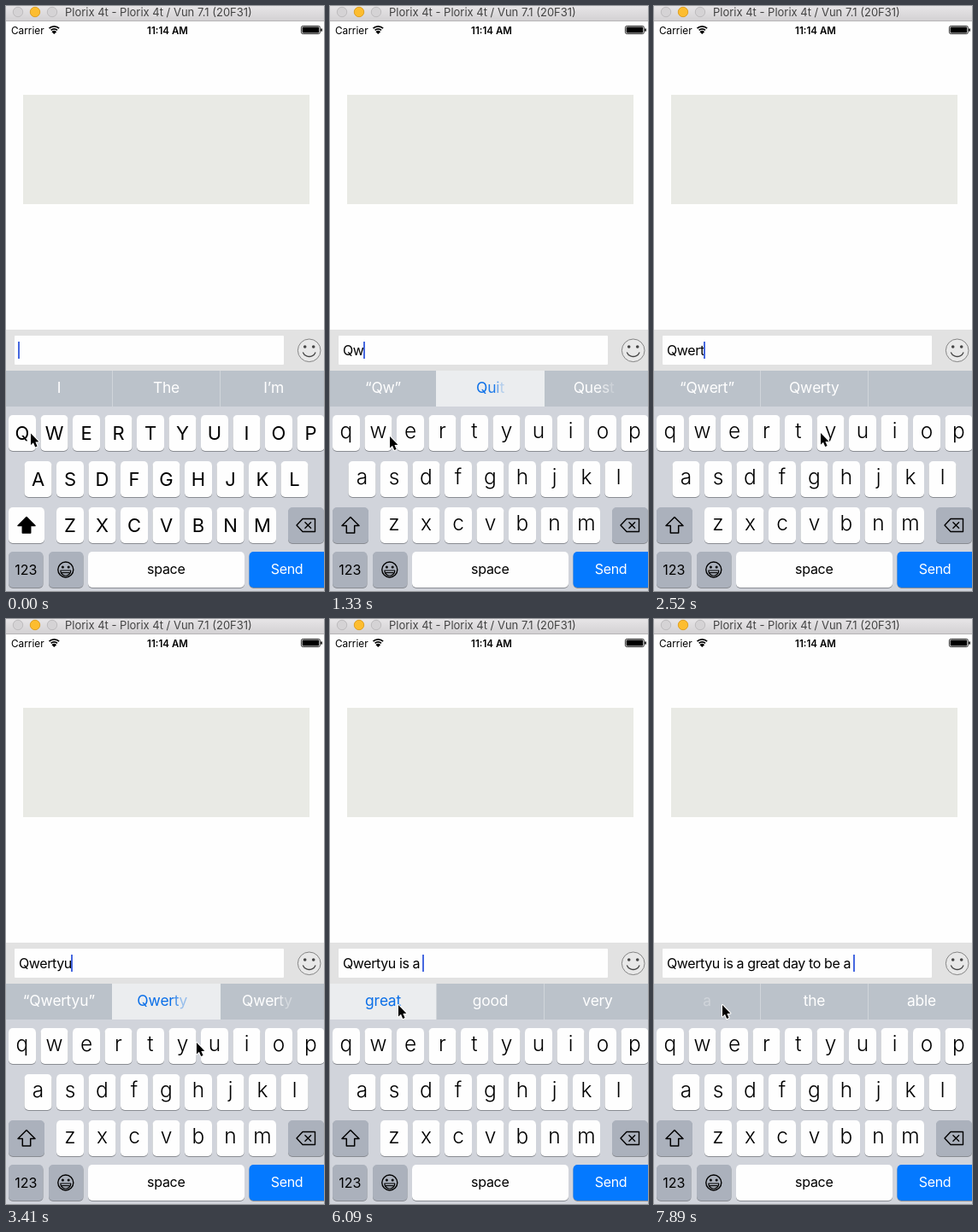
Write an HTML page with a canvas that moves like this. It is 372 by 685 pixels and loops after 8 s.

```html
<!DOCTYPE html>
<html lang="en">
<head>
<meta charset="utf-8">
<title>Keyboard typing</title>
<style>
html, body { margin: 0; width: 100%; height: 100%; overflow: hidden; background: #fff; }
canvas { display: block; }
</style>
</head>
<body>
<canvas id="stage" width="372" height="685"></canvas>
<script>
const ctx = document.getElementById('stage').getContext('2d');
const LOOP = 8000, STEP = 148.8;
const FONT = 'Inter, "Liberation Sans", sans-serif';
const BLUE = '#0a6fe8';

// time, typed text, three suggestions, is the middle one preselected, is the left one pressed to get here
const states = [
  [-999, '', ['I', 'The', 'I’m']],
  [830, 'Q', ['“Q”', 'Quite', 'Question']],
  [1120, 'Qw', ['“Qw”', 'Quit', 'Quests'], true],
  [1480, 'Qwe', ['“Qwe”', 'We', 'Awe'], true],
  [1850, 'Qwer', ['“Qwer”', 'Query', 'Qwerty']],
  [2200, 'Qwert', ['“Qwert”', 'Qwerty', '']],
  [2700, 'Qwerty', ['“Qwerty”', 'Qwerty', 'Qwerty’s']],
  [3200, 'Qwertyu', ['“Qwertyu”', 'Qwerty I', 'Qwerty u'], true],
  [4500, 'Qwertyu ', ['is', 'was', 'and'], false, true],
  [5000, 'Qwertyu is ', ['a', 'the', 'not'], false, true],
  [5600, 'Qwertyu is a ', ['great', 'good', 'very'], false, true],
  [6220, 'Qwertyu is a great ', ['day', 'way', 'time'], false, true],
  [6500, 'Qwertyu is a great day ', ['to', 'for', 'and']],
  [6830, 'Qwertyu is a great day to ', ['be', 'get', 'see']],
  [7270, 'Qwertyu is a great day to be ', ['a', 'the', 'able']],
  [7850, 'Qwertyu is a great day to be a ', ['good', 'great', 'part']]
];

// pointer path: time, x, y
const path = [
  [0, 29, 500.5], [140, 27, 501], [893, 27, 501], [1190, 64, 503], [1339, 70, 504],
  [1500, 98, 503], [1640, 101, 502], [1860, 134, 502], [2232, 172, 502], [2529, 195, 500],
  [2720, 204, 501], [2830, 206, 501], [3200, 240, 503], [3274, 238, 502], [3422, 223, 496],
  [4464, 87, 453], [4613, 86, 452], [5200, 80, 452], [LOOP, 80, 452]
];

const clamp = v => Math.max(0, Math.min(1, v));

function text(str, x, y, size, color, align = 'center', weight = 400, spacing = 0) {
  ctx.font = `${weight} ${size}px ${FONT}`;
  ctx.letterSpacing = spacing + 'px';
  ctx.textAlign = align;
  ctx.fillStyle = color;
  ctx.fillText(str, x, y);
}

function rect(x, y, w, h, color) {
  ctx.fillStyle = color;
  ctx.fillRect(x, y, w, h);
}

function round(x, y, w, h, r, color) {
  ctx.beginPath();
  ctx.roundRect(x, y, w, h, r);
  ctx.fillStyle = color;
  ctx.fill();
}

function disc(x, y, r, fill, stroke, width = 1) {
  ctx.beginPath();
  ctx.arc(x, y, r, 0, Math.PI * 2);
  if (fill) { ctx.fillStyle = fill; ctx.fill(); }
  if (stroke) { ctx.strokeStyle = stroke; ctx.lineWidth = width; ctx.stroke(); }
}

function arc(x, y, r, from, to, color, width) {
  ctx.beginPath();
  ctx.arc(x, y, r, from * Math.PI, to * Math.PI);
  ctx.strokeStyle = color;
  ctx.lineWidth = width;
  ctx.stroke();
}

function shape(points, fill, stroke, width = 1.5) {
  ctx.beginPath();
  points.forEach(([x, y]) => ctx.lineTo(x, y));
  ctx.closePath();
  ctx.lineJoin = 'round';
  if (stroke) { ctx.strokeStyle = stroke; ctx.lineWidth = width; ctx.stroke(); }
  if (fill) { ctx.fillStyle = fill; ctx.fill(); }
}

function key(x, y, w, color = '#fefefe') {
  round(x, y + 1, w, 42, 5, '#898c92');
  round(x, y, w, 42, 5, color);
}

function drawTop() {
  rect(0, 0, 372, 685, '#fefefe');
  const bar = ctx.createLinearGradient(0, 0, 0, 17);
  bar.addColorStop(0, '#e7e5e7');
  bar.addColorStop(1, '#d3d1d3');
  rect(0, 0, 372, 17, bar);
  rect(0, 17, 372, 1, '#b6b4b6');
  disc(14, 7, 5.7, '#d5d3d5', '#bebcbe');
  disc(34, 7, 5.7, '#fdbd2f', '#dfa023');
  disc(54, 7, 5.7, '#d5d3d5', '#bebcbe');
  text('Plorix 4t - Plorix 4t / Vun 7.1 (20F31)', 69, 12, 13, '#434343', 'left');

  text('Carrier', 6, 32.5, 11.8, '#000', 'left');
  for (const r of [9, 6]) arc(56.3, 32, r - 0.8, 1.25, 1.75, '#000', 1.7);
  ctx.beginPath();
  ctx.moveTo(56.3, 33);
  ctx.arc(56.3, 33, 4, 1.25 * Math.PI, 1.75 * Math.PI);
  ctx.fillStyle = '#000';
  ctx.fill();
  text('11:14 AM', 189, 32.5, 11.5, '#000', 'center', 600);
  ctx.strokeStyle = '#000';
  ctx.lineWidth = 0.8;
  ctx.beginPath();
  ctx.roundRect(345.4, 23.4, 22, 9.2, 2);
  ctx.stroke();
  round(346.6, 24.6, 19.6, 6.8, 1, '#000');
  round(368.3, 26.3, 1.6, 3.6, 0.8, '#000');

  rect(20, 104, 335, 128, '#e9eae5');
}

function drawInput(str, caret) {
  rect(0, 379, 372, 48, '#e2e2e2');
  round(10, 386, 315, 34, 1, '#fefefe');
  disc(354.7, 403.3, 13.3, '#e8e8e8', '#858585', 1);
  disc(349.7, 399, 1.8, '#444');
  disc(359.7, 399, 1.8, '#444');
  arc(354.7, 402.5, 8, 0.12, 0.88, '#444', 1.3);
  text(str, 15, 409, 16, '#000', 'left', 400, -0.4);
  const x = 14 + Math.round(ctx.measureText(str).width);
  ctx.globalAlpha = caret;
  rect(x, 393, 2, 20, '#4668e0');
  ctx.globalAlpha = 1;
}

// Letters fade one after another from the left
function word(str, slot, color, p, leaving) {
  const n = str.length, spacing = -0.15;
  ctx.font = `400 17.4px ${FONT}`;
  ctx.letterSpacing = spacing + 'px';
  const shift = leaving ? [0, 16, 10][slot] * Math.min(1, p * 3) : 0;
  const left = 62 + slot * 125.5 - ctx.measureText(str).width / 2 - shift;
  for (let i = 0; i < n; i++) {
    const a = clamp((p * (n + 3) - i) / 3);
    ctx.globalAlpha = leaving ? 1 - a : a;
    const x = left + ctx.measureText(str.slice(0, i)).width;
    text(str[i], x, 453, 17.4, color, 'left', 400, spacing);
  }
  ctx.globalAlpha = 1;
}

function drawSuggestions(t, at) {
  const [since, , words, preselect] = states[at];
  const next = states[at + 1];
  const pressed = next && next[4] && t > next[0] - STEP;
  const lit = pressed ? 0 : preselect ? 1 : -1;
  const age = t - since;
  rect(0, 427, 372, 42, '#bbc2ca');
  rect(124, 427, 1, 42, '#d0d5da');
  rect(250, 427, 1, 42, '#d0d5da');
  if (lit >= 0) rect(lit * 124, 427, lit ? 127 : 124, 42, '#ebedef');
  words.forEach((w, slot) => {
    const color = slot === lit ? BLUE : '#fff';
    const out = slot ? (age - 75) / 115 : age / 70;
    const into = slot ? (age - 150) / 130 : (age - 50) / 60;
    if (at && out < 1) word(states[at - 1][2][slot], slot, color, clamp(out), true);
    if (into > 0) word(w, slot, color, clamp(into), false);
  });
}

function drawKeys(upper) {
  const dark = '#abb1bc';
  rect(0, 469, 372, 216, '#d1d4db');
  [['qwertyuiop', 3, 479], ['asdfghjkl', 21.5, 533], ['zxcvbnm', 59, 587]].forEach(([row, x, y]) => {
    [...row].forEach((c, i) => {
      const kx = x + i * 37.5;
      key(kx, y, 32);
      if (upper) text(c.toUpperCase(), kx + 16, y + 29, 22, '#000');
      else text(c, kx + 16, y + 27, 24.5, '#000', 'center', 350);
    });
  });

  key(3, 587, 42, upper ? '#fefefe' : dark);
  const arrow = [[24, 598.5], [34, 608.5], [28.7, 608.5], [28.7, 617], [19.3, 617], [19.3, 608.5], [14, 608.5]];
  shape(arrow, upper ? '#000' : null, '#000', 1.5);

  key(330, 587, 42, dark);
  shape([[340, 608], [347, 600.5], [361.5, 600.5], [361.5, 615.5], [347, 615.5]], null, '#000', 1.4);
  ctx.beginPath();
  ctx.moveTo(349.5, 604.3); ctx.lineTo(357, 611.8);
  ctx.moveTo(357, 604.3); ctx.lineTo(349.5, 611.8);
  ctx.stroke();

  key(3, 639, 40.5, dark);
  text('123', 23.2, 666, 16, '#000');
  key(50, 639, 40.5, dark);
  disc(69.8, 660, 9, null, '#000', 1.4);
  disc(66.4, 657, 1.5, '#000');
  disc(73.2, 657, 1.5, '#000');
  ctx.beginPath();
  ctx.arc(69.8, 661, 6, 0, Math.PI);
  ctx.closePath();
  ctx.lineWidth = 1.2;
  ctx.stroke();
  ctx.beginPath();
  ctx.moveTo(65, 663.6); ctx.lineTo(74.6, 663.6);
  ctx.stroke();

  key(96, 639, 183);
  text('space', 187.3, 665, 16, '#000', 'center', 400, -0.3);
  key(284.5, 639, 92, '#0479ff');
  text('Send', 328.5, 665, 16, '#fff', 'center', 400, -0.3);
}

function drawPointer(t) {
  const i = path.findIndex(p => p[0] > t);
  const [t0, x0, y0] = path[i - 1], [t1, x1, y1] = path[i];
  const k = (t - t0) / (t1 - t0);
  ctx.save();
  ctx.translate(x0 + (x1 - x0) * k, y0 + (y1 - y0) * k);
  shape([[0, 0], [0, 13.5], [3, 10.8], [5.2, 16], [7.6, 15], [5.4, 10], [9.4, 9.8]], '#000', '#fff', 2);
  ctx.restore();
}

function frame(now) {
  const t = Math.floor((now % LOOP + 16) / STEP) * STEP;
  const at = states.findLastIndex(s => s[0] <= t);
  const caret = at || t < 440 ? 1 : t < 590 ? 0.5 : 0;
  drawTop();
  drawInput(states[at][1], caret);
  drawSuggestions(t, at);
  drawKeys(!at);
  drawPointer(t);
  requestAnimationFrame(frame);
}
requestAnimationFrame(frame);
</script>
</body>
</html>
```
